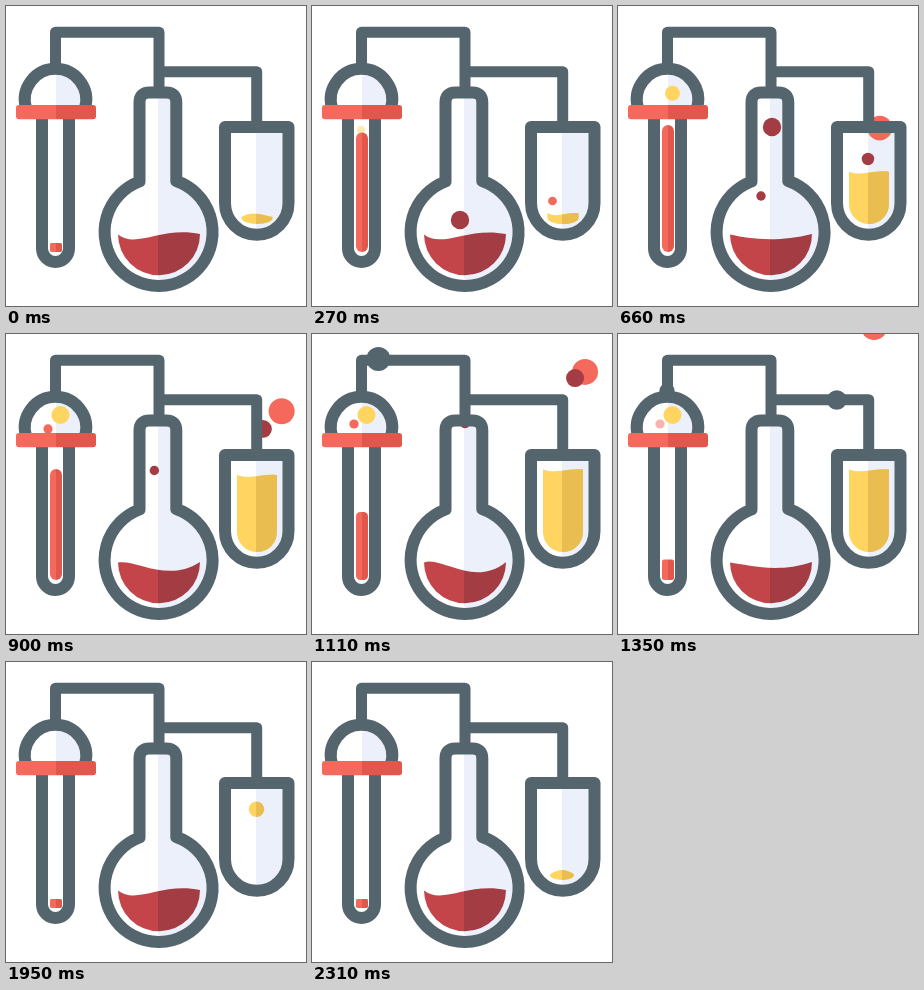
An HTML page for the animation above (2.4 s loop, 300x300 px).

```html
<!DOCTYPE html>
<html lang="en">
<head>
<meta charset="utf-8">
<title>Laboratory</title>
<style>
html, body { margin: 0; width: 100%; height: 100%; overflow: hidden; background: #fff; }
svg { display: block; width: 100%; height: 100%; }
.line { fill: none; stroke: #54656e; stroke-width: 12; stroke-linejoin: round; stroke-linecap: round; }
.pipe { stroke-width: 11; }
.gray { fill: #54656e; }
.red { fill: #f4695c; }
.dark { fill: #a43c43; }
.gold { fill: #ffd460; }
</style>
</head>
<body>
<svg viewBox="0 0 300 300">
  <defs id="defs">
    <path id="tube" d="M36 106V242.500a13.500 13.500 0 0 0 27 0V106"/>
    <path id="dome" d="M20 102A30.700 30.700 0 1 1 79 102"/>
    <path id="flask" d="M133.500 175.500V96.500q0-10 10-10H160.300q10 0 10 10V175A54 54 0 1 1 133.500 175.500Z"/>
    <path id="vial" d="M219 121H282.500V197a31.750 31.750 0 0 1-63.500 0Z"/>
    <clipPath id="inFlask"><use href="#flask"/></clipPath>
    <clipPath id="inVial"><use href="#vial"/></clipPath>
    <clipPath id="inDome"><use href="#dome"/></clipPath>
  </defs>

  <use href="#dome" fill="url(#paleL)"/>
  <use href="#flask" fill="url(#paleM)"/>
  <use href="#vial" fill="url(#paleR)"/>

  <circle id="seed" class="gold"/>
  <rect id="column" x="44" width="12" fill="url(#redL)"/>
  <g clip-path="url(#inDome)">
    <circle id="domeGold" class="gold"/>
    <circle id="domeRed" class="red"/>
  </g>

  <g clip-path="url(#inFlask)">
    <circle id="bigBubble" class="dark"/>
    <circle id="smallBubble" class="dark"/>
  </g>
  <path id="wine" fill="url(#wineM)"/>

  <circle id="redBubble" class="red"/>
  <circle id="darkBubble" class="dark"/>
  <path id="juice" class="gold"/>
  <path id="shade" fill="url(#shadeR)"/>
  <g clip-path="url(#inVial)"><circle id="drop" fill="url(#goldR)"/></g>

  <path class="line pipe" d="M49.500 58V26.200H153V84M153 65.700H250.700V120"/>
  <circle id="knob" class="gray"/>
  <circle id="bulge" class="gray"/>
  <use href="#tube" class="line"/>
  <use href="#dome" class="line"/>
  <use href="#flask" class="line"/>
  <use href="#vial" class="line"/>
  <rect x="10" y="99" width="80" height="14.300" rx="3" fill="url(#redL)"/>
</svg>
<script>
const LOOP = 2400, STEP = 30, LAST = 2310;
const $ = id => document.getElementById(id);

// Two flat tones meeting at a vertical line
function split(id, x, left, right) {
  $('defs').insertAdjacentHTML('beforeend',
    `<linearGradient id="${id}" gradientUnits="userSpaceOnUse" x1="${x - 50}" x2="${x + 50}" y1="0" y2="0">
      <stop offset=".5" stop-color="${left}"/><stop offset=".5" stop-color="${right}"/></linearGradient>`);
}
split('paleL', 49.7, '#fff', '#ecf0fa');
split('paleM', 152.2, '#fff', '#ecf0fa');
split('paleR', 250.4, '#fff', '#ecf0fa');
split('redL', 49.7, '#f4695c', '#e2574c');
split('wineM', 152.2, '#c44549', '#a43c43');
split('goldR', 250.4, '#ffd460', '#e9bd50');
split('shadeR', 250.4, 'rgba(233,189,80,0)', '#e9bd50');

// Progress from 0 to 1 between two times
const linear = (t, a, b) => Math.min(1, Math.max(0, (t - a) / (b - a)));
const easeIn = (t, a, b) => linear(t, a, b) ** 2;
const easeOut = (t, a, b) => 1 - (1 - linear(t, a, b)) ** 2;
const smooth = (t, a, b) => { const u = linear(t, a, b); return u * u * (3 - 2 * u); };
const hump = (t, a, b, c) => smooth(t, a, b) - smooth(t, b, c);

const route = [[49.5, 60], [49.5, 25], [153, 25], [153, 66], [250.7, 66], [250.7, 200]];
function along(s) {
  for (let i = 1; i < route.length; i++) {
    const [a, b] = route[i - 1], [c, d] = route[i], len = Math.hypot(c - a, d - b);
    if (s <= len) return [a + (c - a) * s / len, b + (d - b) * s / len];
    s -= len;
  }
}

function set(id, attrs) {
  for (const k in attrs) $(id).setAttribute(k, attrs[k]);
}

// Circle that exists only from time a to time b
function disc(id, t, [a, b], cx, cy, r, opacity = 1) {
  set(id, { cx, cy, r: t >= a && t <= b ? Math.max(0, r) : 0, opacity });
}

// Liquid with a wavy top and a rounded bottom
function pool(cx, w, top, ry, p, q) {
  const foot = 218 - ry;
  return `M${cx - w} ${top}C${cx - w / 3} ${top + p} ${cx + w / 3} ${top + q} ${cx + w} ${top}` +
    `V${foot}A${w} ${ry} 0 0 1 ${cx - w} ${foot}Z`;
}

function drawTube(t) {
  const height = 9 + 118 * (easeOut(t, 0, 360) - smooth(t, 720, 1500));
  set('column', { y: 246 - height, height, rx: Math.min(6, 1 + height / 20) });
  disc('seed', t, [180, 520], 49, 124 - (t - 270) / 15, 4, linear(t, 180, 360));

  const rise = easeOut(t, 520, 800);
  disc('domeGold', t, [520, 1590], 54.5, 106 - 25 * rise, 3 + 6 * rise, 1 - linear(t, 1380, 1590));
  disc('domeRed', t, [780, 1590], 42, 106 - 16 * easeOut(t, 780, 1050), 4.6, 1 - linear(t, 1110, 1590));
}

function drawFlask(t) {
  const a = 1 - 2 * hump(t, 210, 1110, 1650);
  set('wine', {
    d: `M112 228.500C130 ${232.5 + 10.5 * a} ${159 - 3 * a} ${237 - 17 * a} 194 228A41 41 0 0 1 112 228.500Z`
  });
  disc('bigBubble', t, [160, 860], 148 + (t - 270) / 65, 214 - .2385 * (t - 270), 9.2);
  disc('smallBubble', t, [450, 1170], 143 + (t - 660) / 45, 190 - .223 * (t - 660), 4.7);
}

function drawVial(t) {
  const sway = Math.cos((t - 270) / 700 * Math.PI);
  disc('redBubble', t, [150, 1470], 258.5 - 18 * sway, 195 - .187 * (t - 270), 13 * easeOut(t, 150, 800));
  disc('darkBubble', t, [420, 1370], 250 + .029 * (t - 660), 153 - .242 * (t - 660), 9 * easeOut(t, 420, 960));

  const landed = t > 2160;
  const grow = smooth(t, 240, 560);
  const d = landed
    ? pool(250, 8 + 4 * linear(t, 2160, 2310), 212.5, 5, -6, -6)
    : pool(251, 15.5 + 4.5 * grow, 211 - 75.5 * smooth(t, 150, 1050), 6 + 14 * grow,
        -7 + 12 * linear(t, 0, 270), -2);
  const opacity = landed ? 1 : 1 - linear(t, 1560, 1920);
  set('juice', { d, opacity });
  set('shade', { d, opacity });
  disc('drop', t, [1680, 2160], 250.5, 126 + 85 * easeIn(t, 1740, 2160), 8.5 - 1.5 * linear(t, 1740, 2160));
}

function drawPipe(t) {
  const [x, y] = along(311 * smooth(t, 970, 1510) + 23 * smooth(t, 1500, 1740));
  disc('bulge', t, [930, 1700], x, y, 12 * smooth(t, 930, 1080) - 3.5 * easeOut(t, 1110, 1740));
  disc('knob', t, [960, 1560], 49, 57, 8 * hump(t, 960, 1320, 1560));
}

const start = performance.now();
function tick() {
  const now = (performance.now() - start) % LOOP;
  const t = Math.min(LAST, Math.floor(now / STEP) * STEP);
  [drawTube, drawFlask, drawVial, drawPipe].forEach(draw => draw(t));
  requestAnimationFrame(tick);
}
tick();
</script>
</body>
</html>
```
